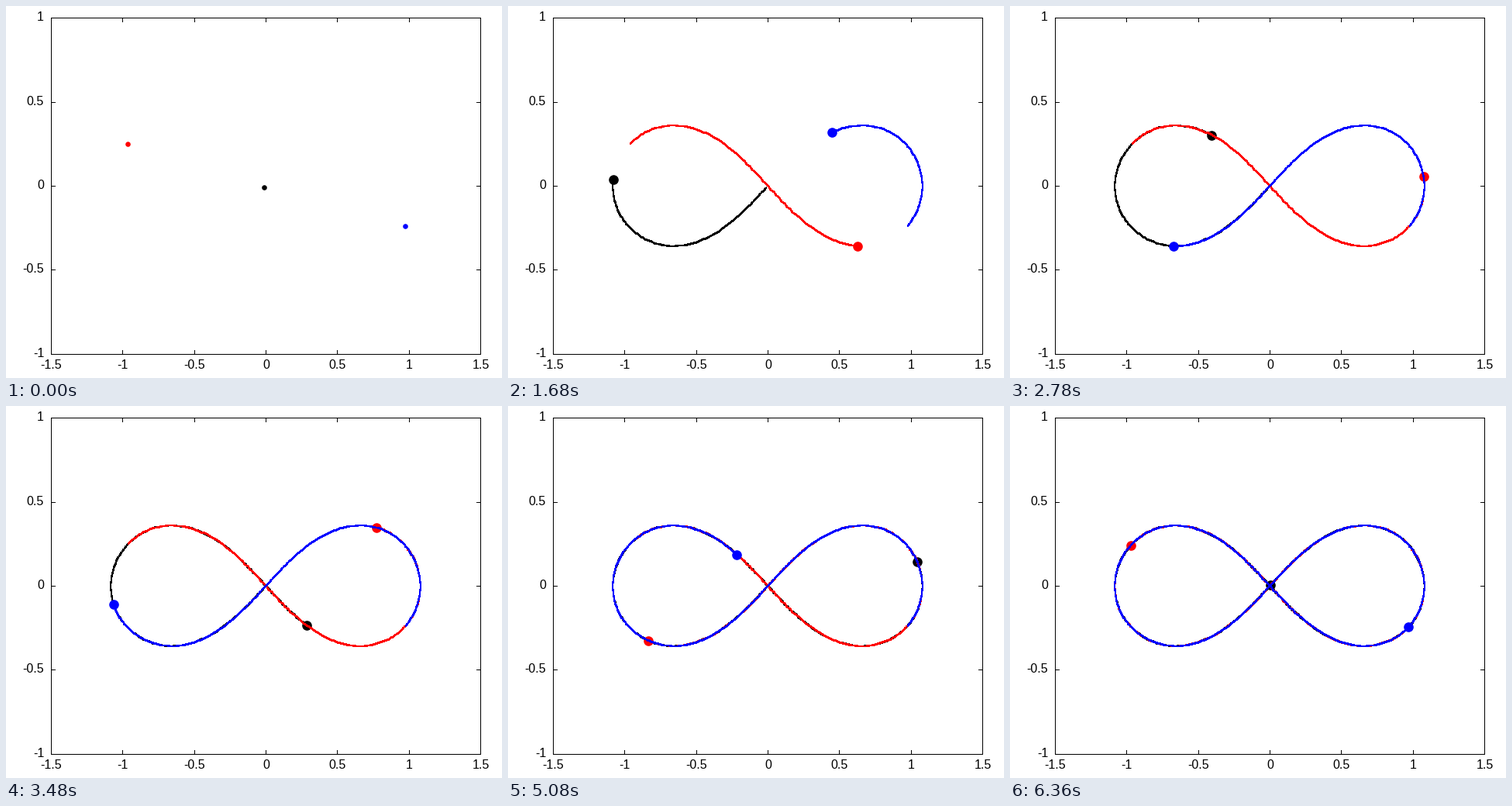
Animation of 640 by 480 pixels, one loop 6.38 s. Source, as a matplotlib script:

```python
import numpy as np
import matplotlib.pyplot as plt
from matplotlib.animation import FuncAnimation
from matplotlib.collections import PolyCollection

plt.rcParams["font.family"] = "Liberation Sans"

W, H, DPI = 640, 480, 100
PX = 72 / DPI
FRAMES, INTERVAL = 319, 20
LEFT, RIGHT, TOP, BOTTOM = 58, 612, 15, 449
DT = 0.001


def to_px(z):
    """Plot coordinates (complex) to whole stage pixels."""
    x = LEFT + (z.real + 1.5) / 3 * (RIGHT - LEFT)
    y = TOP + (1 - z.imag) / 2 * (BOTTOM - TOP)
    return np.rint(x), np.rint(y)


def accel(z):
    d = z[None, :] - z[:, None]
    r = np.abs(d) + np.eye(len(z))
    return (d / r**3).sum(axis=1)


def orbits(steps):
    """Figure-eight three-body orbit, leapfrog integration."""
    start = 0.97000436 - 0.24308753j
    vel = -0.93240737 - 0.86473146j
    z = np.array([0, -start, start])
    v = np.array([vel, -vel / 2, -vel / 2])
    out = np.empty((steps + 1, 3), complex)
    out[0] = z
    a = accel(z)
    for k in range(steps):
        v = v + a * DT / 2
        z = z + v * DT
        a = accel(z)
        v = v + a * DT / 2
        out[k + 1] = z
    return out


def strips(x, y):
    """One parallelogram per segment, two pixels thick across its main axis."""
    p = np.column_stack([x, y])
    a, b = p[:-1], p[1:]
    d = b - a
    flat = np.abs(d[:, :1]) >= np.abs(d[:, 1:])
    along = np.where(flat, [[1, 0]], [[0, 1]])
    across = 1 - along
    cap = np.where(d < 0, -0.5, 0.5) * along
    a = a + along / 2 - cap
    b = b + along / 2 + cap
    return np.stack([a - across, b - across, b + across, a + across], axis=1)


times = np.maximum(0.01, 0.019915 * np.arange(FRAMES) - 0.01)
index = np.rint(times / DT).astype(int)
xs, ys = to_px(orbits(index[-1])[index])
paths = [strips(xs[:, k], ys[:, k]) for k in range(3)]

fig = plt.figure(figsize=(W / DPI, H / DPI), dpi=DPI, facecolor="white")
ax = fig.add_axes([0, 0, 1, 1])
ax.set(xlim=(0, W), ylim=(H, 0))
ax.axis("off")


def stroke(x, y):
    ax.plot(x, y, color="black", lw=PX, antialiased=False, snap=True, zorder=1)


def label(x, y, value, align):
    ax.text(x, y, f"{value:g}", fontsize=16 * PX, ha=align, va="baseline")


stroke([LEFT, RIGHT, RIGHT, LEFT, LEFT], [TOP, TOP, BOTTOM, BOTTOM, TOP])
for value in np.arange(-1.5, 1.6, 0.5):
    x = to_px(complex(value, 0))[0]
    stroke([x, x], [BOTTOM, BOTTOM - 5])
    stroke([x, x], [TOP, TOP + 5])
    label(x + 0.5, 468, value, "center")
for value in np.arange(-1, 1.1, 0.5):
    y = to_px(complex(0, value))[1]
    stroke([LEFT, LEFT + 5], [y, y])
    stroke([RIGHT, RIGHT - 5], [y, y])
    label(49, y + 4, value, "right")

trails, dots = [], []
for k, color in enumerate(["black", "red", "blue"]):
    trail = PolyCollection([], facecolors=color, edgecolors="none",
                           linewidths=0, antialiaseds=False, snap=False,
                           zorder=2 + 2 * k)
    trails.append(ax.add_collection(trail, autolim=False))
    dots += ax.plot([], [], "o", color=color, mew=0, antialiased=False,
                    zorder=3 + 2 * k)


def update(n):
    size = 12.6 if n else 6.6
    for k in range(3):
        trails[k].set_verts(paths[k][:n])
        dots[k].set_data([xs[n, k]], [ys[n, k]])
        dots[k].set_markersize(size * PX)
    return trails + dots


anim = FuncAnimation(fig, update, frames=FRAMES, interval=INTERVAL,
                     init_func=lambda: update(0), repeat=True, repeat_delay=0)
plt.show()
```
